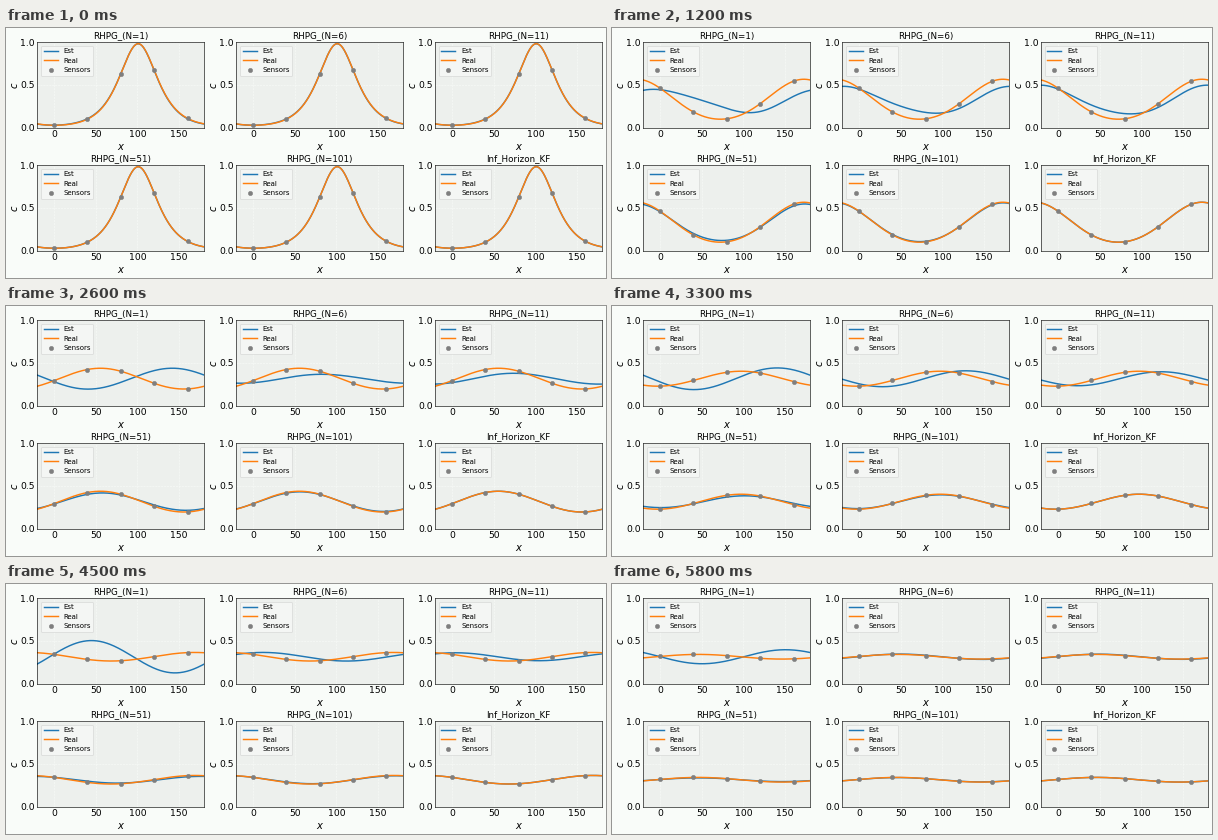
Write a matplotlib script that moves like this. It is 600 px wide and 250 px high and loops after 5.9 s.

```python
import numpy as np
import matplotlib.pyplot as plt
from matplotlib.animation import FuncAnimation

W, H, DPI = 600, 250, 100
FRAMES, INTERVAL = 59, 100
PX = 72 / DPI  # points per pixel

PAPER, PANEL, GREY = "#f9fcf9", "#edf0ed", "#7f7f7f"
BLUE, ORANGE = "#1f77b4", "#ff7f0e"

K = 2 * np.pi / 200  # the domain is periodic with length 200
SPEED, DECAY, WIDTH, T0 = 5.95, 0.0466, 20, 1 / 6
X = np.linspace(-20, 180, 301)
SENSORS = np.arange(0, 161, 40)

# Error of each filter: degrees per step, time of the peak, sine and cosine size
FILTERS = {
    "RHPG_(N=1)": (9.9, 32, .245, .06),
    "RHPG_(N=6)": (9.2, 10, .12, .05),
    "RHPG_(N=11)": (9.2, 10, .095, .048),
    "RHPG_(N=51)": (9.9, 10, .024, .022),
    "RHPG_(N=101)": (9.9, 10, .008, .008),
    "Inf_Horizon_KF": (9.9, 10, 0, 0),
}


def real(x, t):
    """Periodic sech pulse under advection and diffusion."""
    mean = np.pi * WIDTH / 200
    c = np.full(len(x), mean)
    for m in range(1, 14):
        amp = 2 * mean / np.cosh(np.pi * WIDTH * K * m / 2)
        c += amp * np.exp(-DECAY * m * m * t) * np.cos(m * K * (x - 100 - SPEED * t))
    return c


def error(x, t, rate, peak, sin_amp, cos_amp):
    """First harmonic turning at a steady rate, swelling and fading."""
    angle = np.radians(rate) * t
    b = sin_amp * np.exp(-((t - peak) / 50) ** 2) * np.sin(angle)
    a = cos_amp * np.sin(np.pi * t / FRAMES) * np.cos(angle)
    return a * np.cos(K * x) + b * np.sin(K * x)


def make_panel(fig, left, top, title):
    w, h = 167, 85.5
    ax = fig.add_axes([left / W, 1 - (top + h) / H, w / W, h / H], facecolor=PANEL)
    ax.set(xlim=(-20, 180), ylim=(0, 1), xticks=[0, 50, 100, 150], yticks=[0, .5, 1])
    ax.set_axisbelow(True)
    ax.grid(color=PAPER, lw=.4, ls="--")
    ax.tick_params(length=0, labelsize=9.3 * PX, pad=2.5 * PX)
    for spine in ax.spines.values():
        spine.set_linewidth(.6 * PX)
    ax.set_title(title, fontsize=8.8 * PX, pad=4 * PX)
    label = dict(fontsize=10 * PX, style="italic", ha="center", va="center")
    fig.text((left + w / 2) / W, 1 - (top + h + 19) / H, "x", **label)
    fig.text((left - 22.5) / W, 1 - (top + h / 2) / H, "c", rotation=90, **label)

    est, = ax.plot([], [], color=BLUE, lw=1.46 * PX, label="Est")
    true, = ax.plot([], [], color=ORANGE, lw=1.46 * PX, label="Real")
    dots, = ax.plot([], [], "o", color=GREY, ms=4.4 * PX, mew=.3, zorder=3,
                    label="Sensors")
    legend = ax.legend(loc="upper left", fontsize=7 * PX, facecolor="#f6f8f6")
    legend.get_frame().set_linewidth(.6 * PX)
    return est, true, dots


plt.rcParams["font.family"] = "DejaVu Sans"
fig = plt.figure(figsize=(W / DPI, H / DPI), dpi=DPI, facecolor=PAPER)
panels = [
    (make_panel(fig, 31.2 + 199 * (i % 3), 14.1 + 123 * (i // 3), title), params)
    for i, (title, params) in enumerate(FILTERS.items())
]


def update(n):
    t = n + T0
    curve, samples = real(X, t), real(SENSORS, t)
    artists = []
    for (est, true, dots), params in panels:
        est.set_data(X, curve + error(X, t, *params))
        true.set_data(X, curve)
        dots.set_data(SENSORS, samples)
        artists += [est, true, dots]
    return artists


anim = FuncAnimation(fig, update, frames=FRAMES, interval=INTERVAL,
                     repeat=True, repeat_delay=0, blit=False)
plt.show()
```
